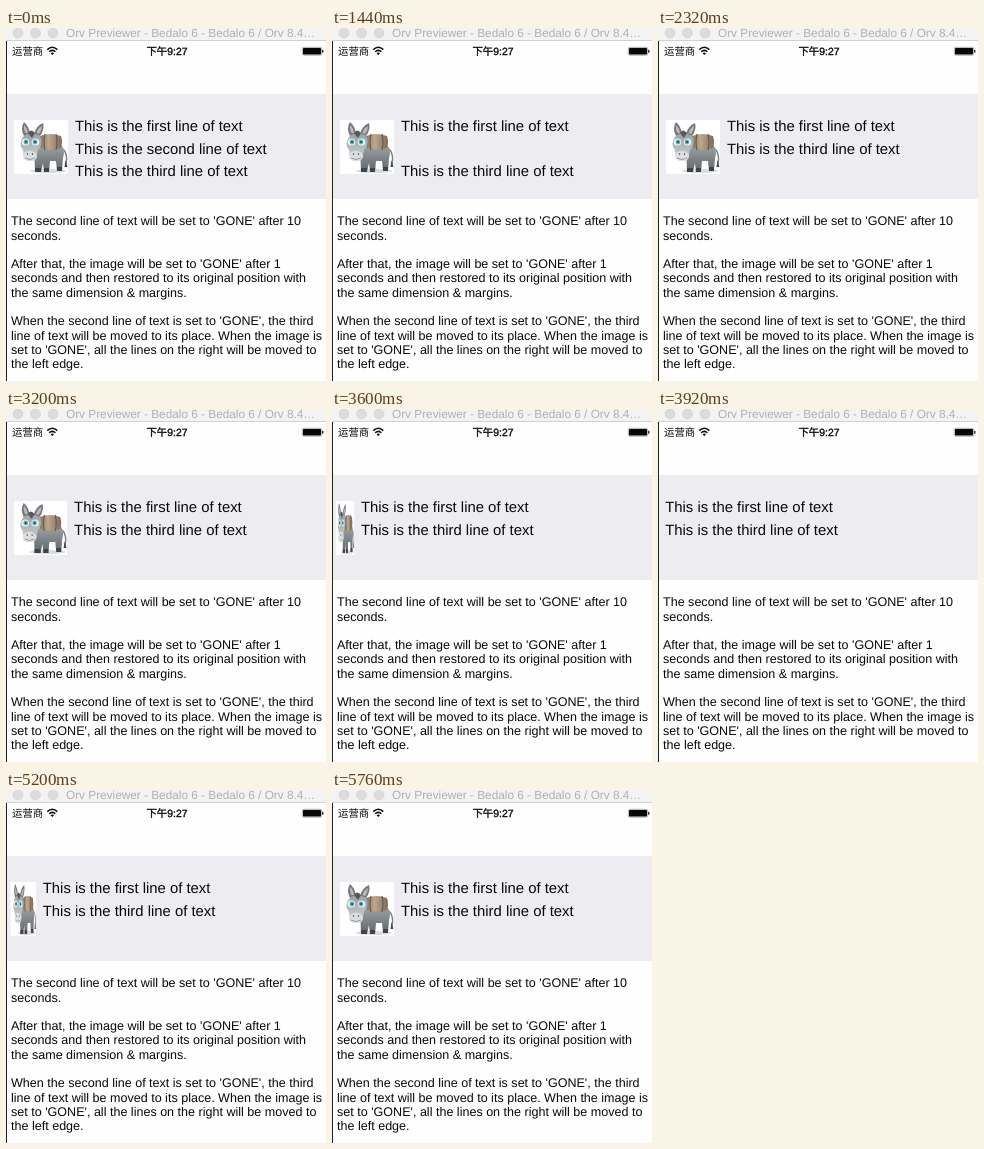
An HTML page that plays this animation: 320 by 353 pixels, repeating every 7.76 s.

```html
<!DOCTYPE html>
<html lang="en">
<head>
<meta charset="utf-8">
<title>Collapsing rows</title>
<style>
  html, body { margin: 0; width: 100%; height: 100%; overflow: hidden; background: #fefefe; }
  svg { display: block; }
  #stage { width: 100vw; height: 100vh; }
  text { font-family: "Liberation Sans", Arial, "Noto Sans CJK SC", "Noto Sans CJK", sans-serif; fill: #080808; text-rendering: geometricPrecision; }
  .title { font-size: 11.8px; fill: #b0b0b0; }
  .status { font-size: 10.4px; }
  .row { font-size: 14.87px; }
  .note { font-size: 12.55px; }
</style>
</head>
<body>
<svg id="stage" viewBox="0 0 320 353">
  <rect width="320" height="353" fill="#fefefe"/>
  <rect width="320" height="12" fill="#f3f3f3"/>
  <rect y="12" width="320" height="1" fill="#d2d2d2"/>
  <g fill="#dcdcdc" stroke="#d0d0d0" stroke-width=".6">
    <circle cx="12" cy="5" r="5"/>
    <circle cx="29.5" cy="5" r="5"/>
    <circle cx="47" cy="5" r="5"/>
  </g>
  <text class="title" x="60" y="9.3">Orv Previewer - Bedalo 6 - Bedalo 6 / Orv 8.4…</text>

  <text class="status" x="6" y="27">运营商</text>
  <g fill="none" stroke="#080808" stroke-width="1.5">
    <path d="M41.3 21.6Q46.3 17 51.3 21.6M43.2 23.8Q46.3 21 49.4 23.8"/>
    <path d="M44.6 25.2Q46.3 23.8 48 25.2L46.3 27Z" fill="#080808" stroke="none"/>
  </g>
  <text class="status" x="161" y="27" text-anchor="middle" stroke="#080808" stroke-width=".35">下午9:27</text>
  <rect x="296.3" y="19.3" width="19.4" height="7.9" rx="1.5" fill="#fefefe" stroke="#777" stroke-width=".6"/>
  <rect x="297" y="20" width="18" height="6.5" rx=".8" fill="#080808"/>
  <rect x="316.2" y="21.8" width="1.2" height="3" rx=".6" fill="#080808"/>

  <rect x="1" y="66" width="319" height="105" fill="#edecf1"/>
  <svg id="pic" x="8" y="92" width="54" height="54" viewBox="0 0 54 54" preserveAspectRatio="none">
    <defs>
      <linearGradient id="fur" x2="0" y2="1">
        <stop stop-color="#a4a9ac"/><stop offset="1" stop-color="#5f656a"/>
      </linearGradient>
      <linearGradient id="face" x2="0" y2="1">
        <stop stop-color="#9a9fa3"/><stop offset="1" stop-color="#d0d3d5"/>
      </linearGradient>
      <linearGradient id="wood">
        <stop stop-color="#85705c"/><stop offset=".4" stop-color="#bda78e"/><stop offset="1" stop-color="#806a56"/>
      </linearGradient>
    </defs>
    <rect width="54" height="54" fill="#fff"/>
    <ellipse cx="34" cy="51" rx="18" ry="2" fill="#d9dbdc"/>
    <path d="M49 29Q54 34 52 44" fill="none" stroke="#777c7f" stroke-width="1.4"/>
    <path d="M51.5 40L53.5 47 50.5 47Z" fill="#45494c"/>
    <path d="M20 25Q27 20 46 24Q52 29 49 38L48 51H43L42 41H36L35 52H30L29 43 27 52H21Z" fill="url(#fur)"/>
    <path d="M21 48H27V52H21ZM30 48H35V52H30ZM43 47H48V51H43Z" fill="#3f4447"/>
    <path d="M26 16Q36 12 47 16Q49 22 47 28Q37 31 27 28Q25 22 26 16Z" fill="url(#wood)"/>
    <path d="M31 14Q29 22 31 30M42 14Q44 22 42 30" fill="none" stroke="#625850" stroke-width="1.1"/>
    <path d="M10 16Q6 8 10 2Q15 6 16 14ZM20 14Q22 6 29 3Q31 9 26 16Z" fill="#74797d"/>
    <path d="M11.5 13Q9 8 10.5 5Q13 8 14 13ZM22.5 13Q24 8 28 6Q28 10 25 14Z" fill="#bfb9b8"/>
    <path d="M9 17Q17 9 27 17Q29 24 24 30L22 39Q16 43 10 39L9 30Q4 24 9 17Z" fill="url(#face)"/>
    <path d="M14 13Q17 8 21 13L18 18Z" fill="#55595d"/>
    <ellipse cx="16" cy="36" rx="7" ry="5.2" fill="#dcdee0"/>
    <path d="M11 38Q16 41 21 38" fill="none" stroke="#777c80" stroke-width=".7"/>
    <g fill="#e7f5f4"><ellipse cx="11.5" cy="22" rx="3.8" ry="3.5"/><ellipse cx="21.5" cy="22" rx="3.8" ry="3.5"/></g>
    <g fill="#55b3b4"><circle cx="12" cy="22" r="2.4"/><circle cx="21" cy="22" r="2.4"/></g>
    <g fill="#24393b"><circle cx="12" cy="22" r=".9"/><circle cx="21" cy="22" r=".9"/><circle cx="13.5" cy="34" r=".7"/><circle cx="18.5" cy="34" r=".7"/></g>
  </svg>
  <text class="row" id="first" y="103.2">This is the first line of text</text>
  <text class="row" id="second" x="69" y="125.8">This is the second line of text</text>
  <text class="row" id="third">This is the third line of text</text>
  <g id="notes"></g>
  <rect y="13" width="1" height="340" fill="#202020"/>
</svg>
<script>
const LOOP = 7760, STEP = 80;
const $ = id => document.getElementById(id);
const pic = $("pic"), first = $("first"), second = $("second"), third = $("third");

const notes = [
  "The second line of text will be set to 'GONE' after 10",
  "seconds.",
  "",
  "After that, the image will be set to 'GONE' after 1",
  "seconds and then restored to its original position with",
  "the same dimension & margins.",
  "",
  "When the second line of text is set to 'GONE', the third",
  "line of text will be moved to its place. When the image is",
  "set to 'GONE', all the lines on the right will be moved to",
  "the left edge."
];
notes.forEach((line, i) => {
  const el = document.createElementNS(first.namespaceURI, "text");
  el.setAttribute("class", "note");
  el.setAttribute("x", 5);
  el.setAttribute("y", 197.2 + 14.3 * i);
  el.textContent = line;
  $("notes").append(el);
});

// Ease in and out: cubic Bezier (.42, 0, .58, 1), solved by bisection.
function ease(x) {
  if (x <= 0) return 0;
  if (x >= 1) return 1;
  let lo = 0, hi = 1;
  for (let i = 0; i < 24; i++) {
    const s = (lo + hi) / 2, r = 1 - s;
    if (1.26 * s * r * r + 1.74 * s * s * r + s ** 3 < x) lo = s; else hi = s;
  }
  return lo * lo * (3 - 2 * lo);
}

const phase = (t, start, length) => ease((t - start) / length);

function draw(ms) {
  const t = Math.floor((ms % LOOP) / STEP) * STEP;
  const lift = phase(t, 1420, 900);
  const shown = 1 - phase(t, 3130, 800) + phase(t, 4805, 810);
  const x = 7.2 + 61.8 * shown;

  second.setAttribute("visibility", t < 1440 ? "visible" : "hidden");
  first.setAttribute("x", x);
  third.setAttribute("x", x);
  third.setAttribute("y", 148.2 - 22.4 * lift);
  pic.setAttribute("x", 1 + 7 * shown);
  pic.setAttribute("width", 54 * shown);
}

const begin = performance.now();
function tick() {
  draw(performance.now() - begin);
  requestAnimationFrame(tick);
}
tick();
</script>
</body>
</html>
```
